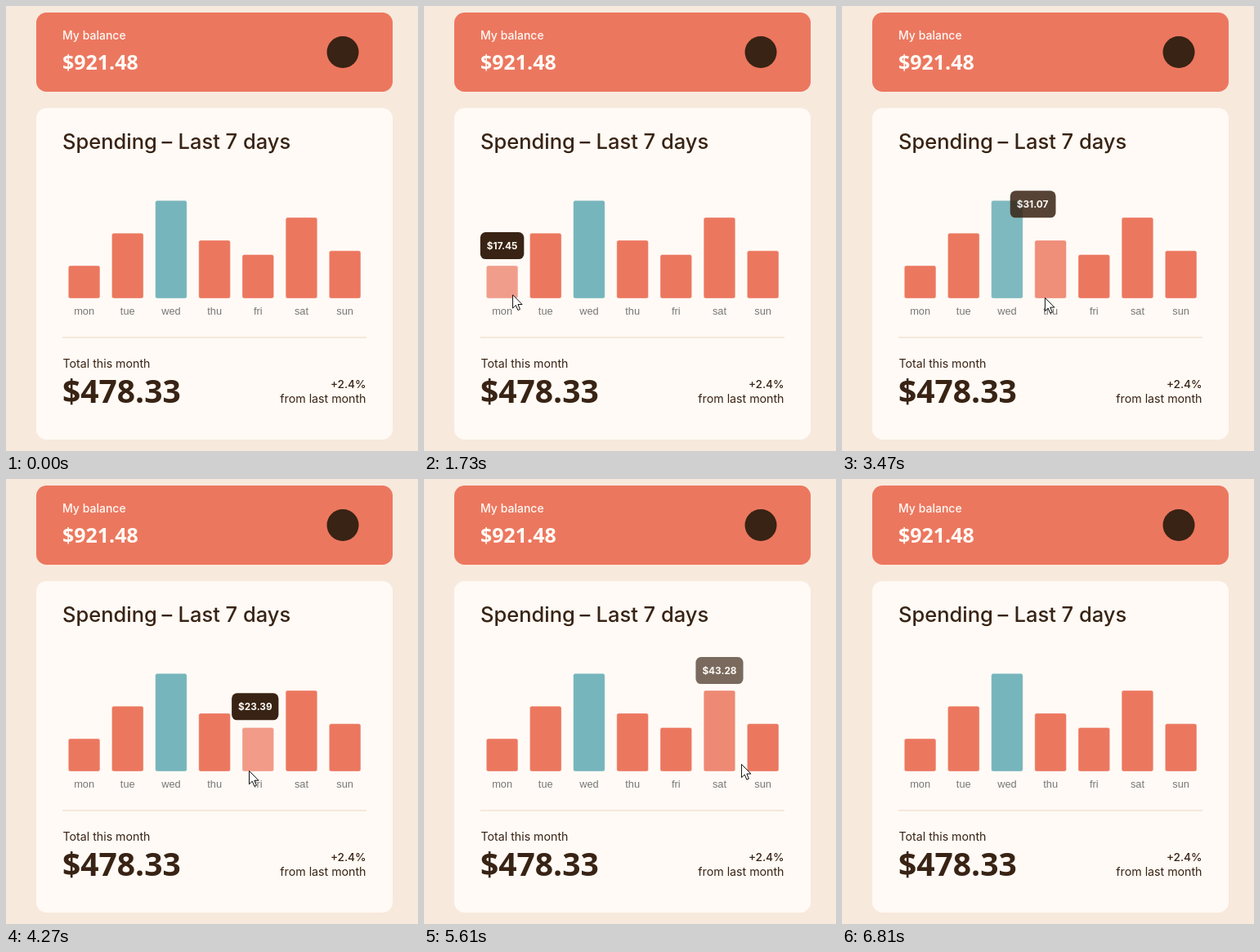
Write an HTML page that moves like this. It is 504 px wide and 545 px high and loops after 7.2 s.

```html
<!DOCTYPE html>
<html lang="en">
<head>
<meta charset="utf-8">
<title>Spending chart</title>
<style>
  html, body { margin: 0; height: 100%; overflow: hidden; background: #f8e9dd; }
  svg { display: block; font-family: Inter, "Open Sans", sans-serif; fill: #382314; }
  .num { font-family: "Open Sans", "Noto Sans", sans-serif; font-weight: 700; }
  .day { font: 12.8px "Liberation Sans", Arial, sans-serif; fill: #777; text-anchor: middle; }
  .medium { font-weight: 500; }
  .bold { font-weight: 700; }
  .light { fill: #fffaf5; }
  .end { text-anchor: end; }
</style>
</head>
<body>
<svg width="504" height="545" viewBox="0 0 504 545">
  <rect x="37" y="8" width="436" height="97" rx="12.5" fill="#ec775f"/>
  <text class="light medium" x="69" y="41" font-size="14">My balance</text>
  <text class="light num" x="69" y="78" font-size="25">$921.48</text>
  <circle cx="412" cy="56.5" r="19.5"/>

  <rect class="light" x="37" y="125" width="436" height="406" rx="12.5"/>
  <text class="medium" y="175" font-size="25.5"><tspan x="69">Spending</tspan><tspan x="190.5">–</tspan><tspan x="210.5">Last 7 days</tspan></text>
  <g id="chart"></g>
  <rect x="69" y="405" width="372" height="2" fill="#f5e8dc"/>
  <text x="69.5" y="443" font-size="14.2">Total this month</text>
  <text class="num" x="69" y="486" font-size="39">$478.33</text>
  <text class="end medium" x="440.5" y="468" font-size="13.6">+2.4%</text>
  <text class="end" x="440.5" y="486" font-size="14.2">from last month</text>

  <g id="tip">
    <rect height="33" rx="6.5"/>
    <text class="light bold" x="8" y="20.8" font-size="11.8"></text>
  </g>
  <path id="cursor" d="M.5 .5V16.8L4.3 13.2L6.9 19.3L9.4 18.2L6.9 12.2H12Z" fill="#fff" stroke="#111"/>
</svg>
<script>
  const LOOP = 7200, BASE = 358, HALF = 19.3, FADE = 200, EASE = 400;
  const spending = { mon: 17.45, tue: 34.91, wed: 52.36, thu: 31.07, fri: 23.39, sat: 43.28, sun: 25.48 };

  // pointer moves: start, end, x, y; it rests in between
  const entry = [64, 540], shownFrom = 450, shownTo = 6805;
  const moves = [
    [440, 1170, 106, 354],
    [1700, 1920, 158, 336],
    [2288, 2630, 212, 328],
    [3260, 3480, 248, 357],
    [3870, 4155, 297, 357],
    [4600, 5000, 376, 350],
    [5430, 5910, 418, 346],
    [6310, 6810, 489, 424]
  ];

  const $ = q => document.querySelector(q);
  const clamp = v => Math.min(1, Math.max(0, v));
  const mix = (a, b, k) => a + (b - a) * k;
  const easeOut = v => 1 - (1 - clamp(v)) ** 4;
  const easeInOut = v => v < .5 ? 2 * v * v : 1 - 2 * (1 - v) ** 2;
  const place = (el, x, y) => el.setAttribute('transform', `translate(${x} ${y})`);

  const tip = $('#tip'), tipBox = $('#tip rect'), tipText = $('#tip text'), cursor = $('#cursor');

  const pointer = t => moves.reduce(([x, y], [start, end, toX, toY]) => {
    const k = easeInOut(clamp((t - start) / (end - start)));
    return [mix(x, toX, k), mix(y, toY, k)];
  }, entry);

  const bars = Object.entries(spending).map(([day, amount], i) => {
    tipText.textContent = '$' + amount;
    return {
      day, amount,
      mid: 95.6 + i * 53.17,
      top: BASE - amount * 2.286,
      width: tipText.getComputedTextLength() + 16
    };
  });

  // find when the pointer enters and leaves each bar
  for (let t = 0; t < LOOP; t++) {
    const [x, y] = pointer(t);
    for (const b of bars) {
      if (Math.abs(x - b.mid) > HALF || y < b.top || y > BASE) continue;
      b.on ??= t;
      b.off = t;
    }
  }

  $('#chart').innerHTML = bars.map(b => `
    <rect x="${b.mid - HALF}" y="${b.top}" width="${2 * HALF}" height="${BASE - b.top}" rx="2.5"
      fill="${b.day === 'wed' ? '#76b5bc' : '#ec775f'}" stroke="#fffaf5" stroke-opacity=".35"/>
    <text class="day" x="${b.mid}" y="378">${b.day}</text>`).join('');
  const rects = document.querySelectorAll('#chart rect');

  function drawBars(t) {
    bars.forEach((b, i) => {
      const hover = easeOut((t - b.on) / EASE) - easeOut((t - b.off) / EASE);
      rects[i].setAttribute('opacity', 1 - .3 * hover);
    });
  }

  function drawTip(t) {
    const i = bars.findLastIndex(b => b.on <= t);
    if (i < 0) return tip.setAttribute('opacity', 0);
    const b = bars[i], prev = bars[i - 1] || b;
    const k = easeOut((t - b.on) / EASE);
    const left = i ? clamp(1 - (b.on - prev.off) / FADE) : 0;
    const alpha = t > b.off ? 1 - (t - b.off) / FADE : mix(left, 1, clamp((t - b.on) / FADE));
    const width = mix(prev.width, b.width, k);
    tip.setAttribute('opacity', clamp(alpha));
    place(tip, mix(prev.mid, b.mid, k) - width / 2, mix(prev.top, b.top, k) - 41);
    tipBox.setAttribute('width', width);
    tipText.textContent = '$' + b.amount;
  }

  function drawCursor(t) {
    place(cursor, ...pointer(t));
    cursor.setAttribute('visibility', t >= shownFrom && t < shownTo ? 'visible' : 'hidden');
  }

  const start = performance.now();
  function draw() {
    const t = (performance.now() - start) % LOOP;
    drawBars(t);
    drawTip(t);
    drawCursor(t);
    requestAnimationFrame(draw);
  }
  draw();
</script>
</body>
</html>
```
